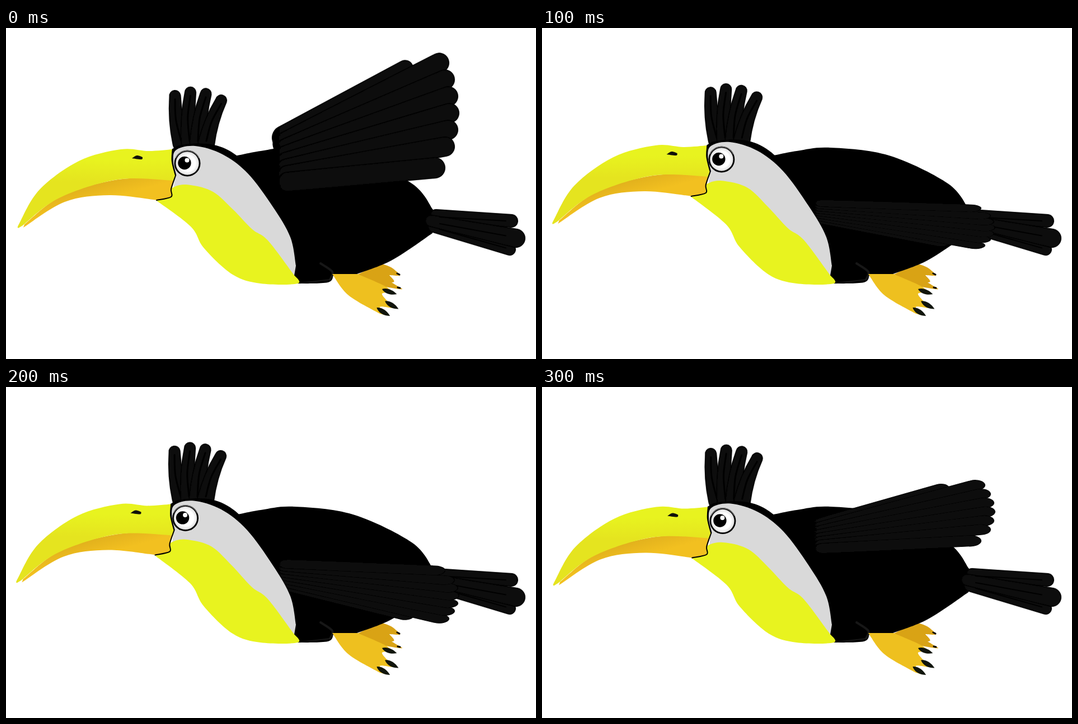
Animation, 947 px wide and 592 px high, one loop 350 ms. Source, as an HTML page:

```html
<!DOCTYPE html>
<html lang="en">
<head>
<meta charset="utf-8">
<title>Flying toucan</title>
<style>
  html, body { margin: 0; width: 100%; height: 100%; overflow: hidden; background: #fff; }
  svg { display: block; width: 100vw; height: 100vh; }
</style>
</head>
<body>
<svg viewBox="0 0 947 592">
  <defs>
    <linearGradient id="mandible" gradientUnits="userSpaceOnUse" x1="170" y1="270" x2="180" y2="306">
      <stop offset="0" stop-color="#dfae1c"/><stop offset="1" stop-color="#f2c020"/>
    </linearGradient>
    <linearGradient id="bill" gradientUnits="userSpaceOnUse" x1="0" y1="235" x2="0" y2="275">
      <stop offset="0" stop-color="#e8f31f"/><stop offset="1" stop-color="#e5e41f"/>
    </linearGradient>
    <linearGradient id="plume" gradientUnits="userSpaceOnUse" x1="485" y1="0" x2="600" y2="0">
      <stop offset="0" stop-color="#060606"/><stop offset="1" stop-color="#101010"/>
    </linearGradient>
    <radialGradient id="eyeball">
      <stop offset=".7" stop-color="#fff"/><stop offset="1" stop-color="#dedede"/>
    </radialGradient>
    <filter id="soft" x="-20%" y="-20%" width="140%" height="140%"><feGaussianBlur stdDeviation="1.5"/></filter>
  </defs>
  <g id="backFoot"></g>
  <g id="body"></g>
  <g id="tail"></g>
  <g id="wing"></g>
  <g id="frontFoot"></g>
  <g id="crest"></g>
  <g id="face"></g>
  <g id="beak"></g>
  <g id="eye">
    <circle cx="324" cy="242" r="23.5"/>
    <circle cx="324" cy="242" r="20.7" fill="url(#eyeball)"/>
    <path d="M303 233A23 23 0 0 1 345 233" fill="none" stroke="#777" stroke-width="1.2"/>
    <circle cx="319" cy="241.5" r="11.7"/>
    <circle cx="323.5" cy="236.5" r="4" fill="#fff"/>
  </g>
</svg>
<script>
const $ = id => document.getElementById(id);
const STEP = 50, POSES = 7, HINGE = 303.5;
const YELLOW = '#e8f31f', GREY = '#d9d9d9', DARK = '#101010', ORANGE = '#eec01f', OCHRE = '#d9a315';

// Smooth curve through a few key points; "/" marks a corner.
function curve(text, move = p => p) {
  let d = '', last;
  for (const part of text.split('/')) {
    const pts = part.trim().split(/\s+/).map(s => move(s.split(',').map(Number)));
    if (last) pts.unshift(last);
    else d = 'M' + pts[0];
    const at = i => pts[Math.max(0, Math.min(pts.length - 1, i))];
    const handle = (i, k) => at(i).map((v, a) => v + k * (at(i + 1)[a] - at(i - 1)[a]) / 6);
    for (let i = 0; i < pts.length - 1; i++)
      d += `C${handle(i, 1)} ${handle(i + 1, -1)} ${pts[i + 1]}`;
    last = pts[pts.length - 1];
  }
  return d;
}

function path(group, d, attrs) {
  const el = document.createElementNS('http://www.w3.org/2000/svg', 'path');
  el.setAttribute('d', d);
  for (const key in attrs) el.setAttribute(key, attrs[key]);
  $(group).append(el);
  return el;
}
const shape = (group, text, fill = '#000') => path(group, curve(text), { fill });
const line = (group, text, width, stroke = '#000') =>
  path(group, curve(text), { fill: 'none', stroke, 'stroke-width': width, 'stroke-linecap': 'round' });

// Round-ended feather from root to tip, bowed sideways by bend, with a soft lighter core.
function feather(group, [x0, y0], [x1, y1], r0, r1, bend = 0, fill = DARK) {
  const length = Math.hypot(x1 - x0, y1 - y0);
  const nx = (y1 - y0) / length, ny = (x0 - x1) / length;
  const outline = inset => {
    const a = r0 - inset, b = r1 - inset, mid = (a + b) / 2;
    const side = (x, y, r) => `${x + nx * r} ${y + ny * r}`;
    const cx = (x0 + x1) / 2, cy = (y0 + y1) / 2;
    return `M${side(x0, y0, a)}Q${side(cx, cy, bend + mid)} ${side(x1, y1, b)}` +
      `A${b} ${b} 0 0 1 ${side(x1, y1, -b)}Q${side(cx, cy, bend - mid)} ${side(x0, y0, -a)}` +
      `A${a} ${a} 0 0 1 ${side(x0, y0, a)}`;
  };
  path(group, outline(0));
  path(group, outline(1.5), { fill, filter: 'url(#soft)' });
}

// Feet
shape('backFoot', '625,443 / 650,430 672,422 / 688,428 703,440 / 703,443 685,442 / 690,455 625,443', OCHRE);
line('backFoot', '699,439 703,441', 3);
shape('frontFoot', '628,440 660,440 704,464 / 703,467 640,456 / 628,440', OCHRE);
line('frontFoot', '700,464 704,465', 3);
shape('frontFoot', '583,440 612,478 668,511 / 680,514 / 668,499 690,501 / 681,488 / 672,475 690,473 / 676,461 628,440 / 583,440', ORANGE);
for (const [x, y, angle] of [[685, 472, 17], [689, 496, 28], [674, 508, 30]])
  path('frontFoot', 'M-14-1C-8-6 4-6 14 0C5 5-6 6-14-1', { fill: '#11150c', transform: `translate(${x} ${y}) rotate(${angle})` });

// Body
shape('body', '395,232 455,220 515,214 620,228 725,278 763,325 / 762,367 / 690,415 627,440 / 585,442 / 575,455 521,457 / 513,442 / 460,310 395,232');
line('body', '562,421 583,436 579,450', 4, '#171717');
line('body', '579,450 528,456', 2, '#171717');

// Tail
feather('tail', [768, 334], [903, 345], 10, 12);
feather('tail', [764, 356], [900, 396], 10, 11);
feather('tail', [760, 345], [911, 376], 11, 17);
for (const y of [338, 350, 360])
  line('tail', `775,${y} 893,${345 + (y - 338) * 2.2}`, 2);

// Wing: a shorter leading feather, a fan with tips on a parabola, a short trailing one
const wingRoot = k => [497 + 6 * k, 196 + 79 * k];
const wingFeather = (k, tip, r) => feather('wing', wingRoot(k), tip, 22 - 4 * k, r, 0, 'url(#plume)');
wingFeather(0, [713, 72], 15);
for (let i = 0; i < 6; i++)
  wingFeather((i + 1) / 7, [792 - 2 * (i - 3) ** 2, 62 + 30 * i], 18);
wingFeather(1, [766, 250], 19);

// Crest
for (let i = 0; i < 4; i++) {
  const root = 313 + 15 * i, x = 302 + 27.5 * i, y = 115 + 4.5 * (i - 1.2) ** 2;
  feather('crest', [root, 206], [x, y], 15.5, 10.5, 6);
  line('crest', `${x},${y + 6} ${(x + root) / 2 - 4},${(y + 206) / 2} ${root},202`, 3);
}

// Face: stretches with the head while the breast stays put
const face = [
  ['296,250 296,219 320,208 371,209 412,228 450,270 / 400,300 296,250', '#000'],
  ['299,291 302,266 / 299,245 303,219 338,211 387,226 432,260 477,320 508,374 518,425 / 515,443 / 299,291', GREY],
  ['268,308 / 301,284 330,281 370,293 405,324 440,360 468,380 514,441 / 521,457 455,457 405,441 354,394 330,355 268,308', YELLOW]
].map(([text, fill]) => ({ text, el: shape('face', text, fill) }));

// Beak
shape('beak', '33,351 100,300 200,271 302,268 / 296,289 294,303 / 270,308 / 185,299 105,311 31,357 / 33,351', 'url(#mandible)');
shape('beak', '22,358 / 24,349 60,289 130,238 205,217 255,220 297,217 / 297,238 303,264 / 301,273 / 200,271 95,304 30,353 / 22,358', 'url(#bill)');
shape('beak', '225,233 234,228 244,231 / 242,235 225,233', '#10110a');
line('beak', '298,217 297,238 303,263', 2.5);
line('beak', '303,264 295,288 295,302 269,308', 2);

// Wing height, from 1 (raised) through 0 (edge-on) to negative (lowered)
const wingBeat = a =>
  .1 + .793 * Math.cos(a + .295) + .108 * Math.cos(2 * a - 1.21) + .117 * Math.cos(3 * a - .516);
const shift = (id, x, y) => $(id).setAttribute('transform', `translate(${x} ${y})`);
const clamp = v => Math.max(0, Math.min(1, v));

function draw(time) {
  const pose = Math.floor(time / STEP) % POSES;
  const beat = wingBeat(2 * Math.PI * pose / POSES);
  const lift = 5.2 * (1 - beat); // the head rises as the wing goes down
  $('wing').setAttribute('transform', `translate(0 ${HINGE}) scale(1 ${beat}) translate(0 ${-HINGE})`);
  shift('beak', -lift / 3, -lift);
  shift('eye', -lift * .45, -lift);
  shift('crest', -lift * .12, -lift * .8);
  const follow = ([x, y]) => {
    const pull = lift * clamp((517 - x) / 140) * clamp((430 - y) / 130);
    return [x - pull / 3, y - pull];
  };
  for (const { text, el } of face) el.setAttribute('d', curve(text, follow));
}

const start = performance.now();
function tick() {
  draw(performance.now() - start);
  requestAnimationFrame(tick);
}
tick();
</script>
</body>
</html>
```
